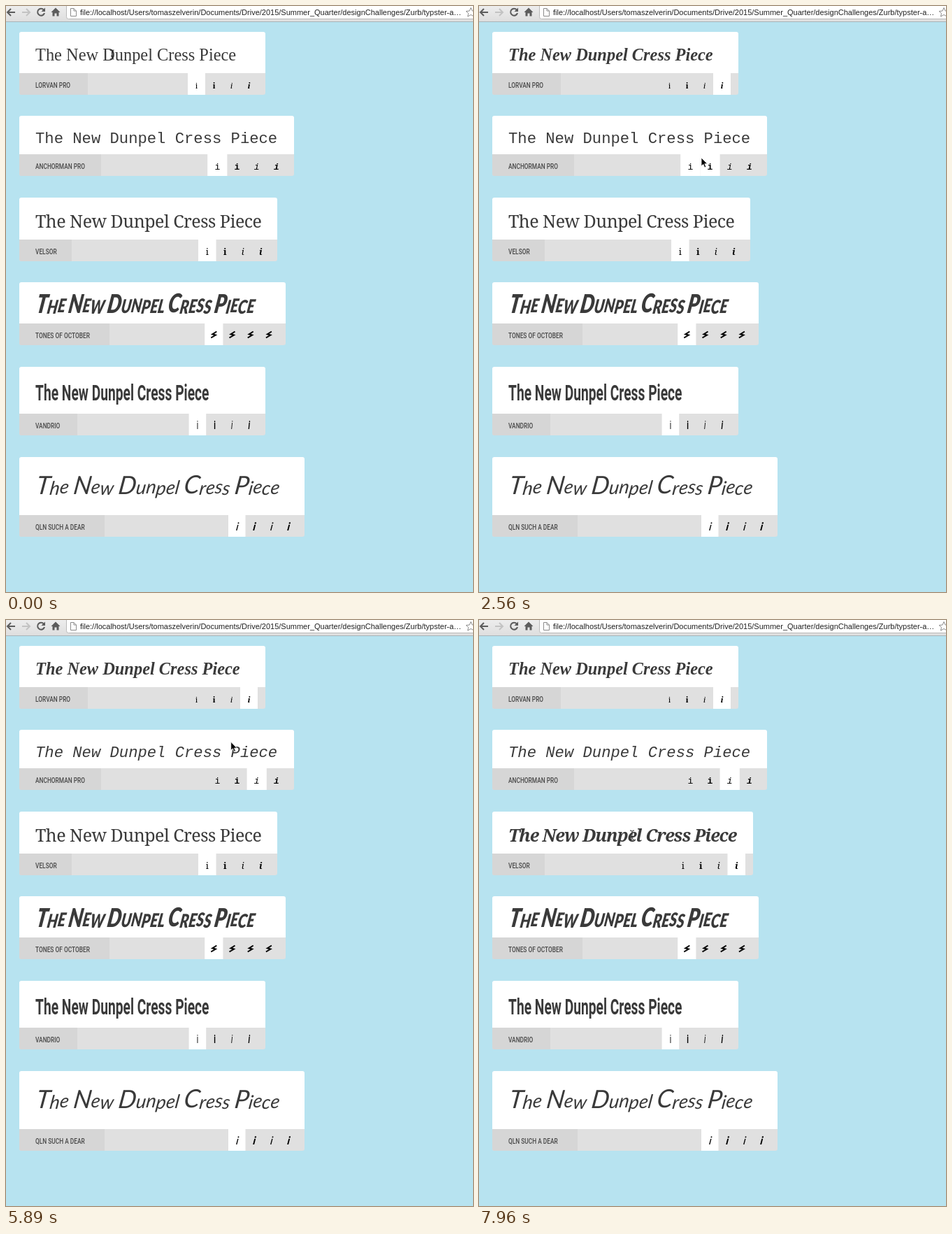
Animation of 668x838 px, one loop 8 s. Source, as an HTML page:

```html
<!DOCTYPE html>
<html lang="en">
<head>
<meta charset="utf-8">
<title>Font preview cards</title>
<style>
html, body { margin: 0; width: 100%; height: 100%; overflow: hidden; background: #b7e3f0; }
svg { display: block; width: 100%; height: 100%; }
.title { fill: #3a3a3a; }
.label { font: 500 11px Roboto, sans-serif; fill: #484848; }
.url { font: 11px "Liberation Sans", Arial, sans-serif; fill: #222; }
</style>
</head>
<body>
<svg id="stage" viewBox="0 0 668 838">
  <defs>
    <linearGradient id="chrome" x2="0" y2="1">
      <stop offset="0" stop-color="#ededed"/><stop offset="1" stop-color="#dedede"/>
    </linearGradient>
  </defs>
  <rect width="668" height="838" fill="#b7e3f0"/>
  <rect width="668" height="22" fill="url(#chrome)"/>
  <path d="M0 22.5H668" stroke="#a9b4b8"/>
  <rect x="86.5" y="-3.5" width="600" height="22" rx="3" fill="#fff" stroke="#b9b9b9"/>
  <g fill="none" stroke="#5c5c5c" stroke-width="2">
    <path d="M13 9H2M7 4L2 9L7 14"/>
    <path d="M23 9H34M29 4L34 9L29 14" stroke="#c3c3c3"/>
    <path d="M54 5.5A5 5 0 1 0 55 10"/>
    <path d="M56 2.5V8H50.5Z" fill="#5c5c5c" stroke="none"/>
    <path d="M71 2.5L64.5 9H66.5V14.5H69.5V10.5H72.5V14.5H75.5V9H77.5Z" fill="#5c5c5c" stroke="none"/>
    <path d="M92.5 3.5H97L100.5 7V14.5H92.5ZM97 3.5V7H100.5" stroke="#8c8c8c" stroke-width="1"/>
    <path d="M665 2.5L667 7L672 7.5L668.5 10.5L669.5 15L665 12.5L660.5 15L661.5 10.5L658 7.5L663 7Z" stroke="#8c8c8c" stroke-width="1"/>
  </g>
  <text class="url" x="106" y="13">file://localhost/Users/tomaszelverin/Documents/Drive/2015/Summer_Quarter/designChallenges/Zurb/typster-a…</text>
</svg>
<script>
const LOOP = 8000, TOP = 37, LEFT = 19, PAD = 42;
const BAR = 31, GAP = 30.6, TRAY_END = 11;
const PHRASE = 'The New Dunpel Cress Piece';
const stage = document.getElementById('stage');

// Styles run regular, bold, italic, bold italic
const isBold = style => style % 2 === 1;
const isItalic = style => style > 1;

function add(tag, attrs, parent = stage) {
  const el = document.createElementNS('http://www.w3.org/2000/svg', tag);
  for (const k in attrs) el.setAttribute(k, attrs[k]);
  return parent.appendChild(el);
}

function write(str, x, y, attrs, { narrow = 1, lean = 0 } = {}, parent = stage) {
  const transform = `translate(${x} ${y}) scale(${narrow} 1) skewX(${-lean})`;
  const el = add('text', { transform, ...attrs }, parent);
  el.textContent = str;
  return el;
}

// Hand lettering: large initials, small followers, a wobbling baseline
function scrawl(el, big, small, upper) {
  el.textContent = '';
  let last = 0;
  [...PHRASE].forEach((ch, i) => {
    const lift = Math.sin(i * 2.4);
    const span = add('tspan', { 'font-size': ch >= 'A' && ch <= 'Z' ? big : small, dy: lift - last }, el);
    span.textContent = upper ? ch.toUpperCase() : ch;
    last = lift;
  });
}

// Rectangle path rounded by a at the top and b at the bottom
const panel = (x, y, w, h, a, b) =>
  `M${x + a} ${y}h${w - 2 * a}q${a} 0 ${a} ${a}V${y + h - b}q0 ${b} ${-b} ${b}` +
  `h${2 * b - w}q${-b} 0 ${-b} ${-b}V${y + a}q0 ${-a} ${a} ${-a}z`;

// Each click moves to the next style, unless order says otherwise
const CARDS = [
  { name: 'LORVAN PRO', head: 59, drop: 18, tag: 117, right: 371, step: 25,
    font: '"Liberation Serif", Times, serif', size: 24.4, clicks: [370, 970, 1500] },
  { name: 'ANCHORMAN PRO', head: 55, drop: 16, tag: 136, right: 412, step: 28.2,
    font: '"Liberation Mono", "Courier New", monospace', size: 22.2,
    clicks: [2740, 3780, 4240, 5060], order: [0, 1, 2, 3, 2], hover: 240 },
  { name: 'VELSOR', head: 60, drop: 17, tag: 94, right: 388, step: 25.5,
    font: '"Noto Serif", serif', size: 25, weight: 500, grow: [0, 14, -2, 4], tight: true,
    clicks: [6840, 6960, 7140, 7490, 7670, 7780, 7960] },
  { name: 'TONES OF OCTOBER', head: 59, drop: 15, tag: 148, right: 400, step: 26.2,
    font: 'Lato, sans-serif', weight: 900, slope: true, face: { narrow: 0.76, lean: 12 },
    hand: [37, 27, true], mark: 'M4 -4.5L-2 -0.7L2.5 0.5L-4 4.5' },
  { name: 'VANDRIO', head: 67, drop: 19, tag: 102, right: 371, step: 24.6,
    font: 'Roboto, sans-serif', size: 31, weight: 600, face: { narrow: 0.62 }, icon: 16 },
  { name: 'QLN SUCH A DEAR', head: 83, drop: 30, tag: 141, right: 427, step: 24.5,
    font: 'Lato, sans-serif', slope: true, face: { lean: 8 }, hand: [36, 27, false], icon: 16 }
];

function build(c) {
  c.base = c.bar - c.drop;
  c.card = add('path', { fill: '#fff' });
  c.strip = add('path', { fill: '#e0e0e0' });
  add('path', { fill: '#d6d6d6', d: panel(LEFT, c.bar, c.tag - LEFT, BAR, 0, 3) });
  add('rect', { fill: '#d6d6d6', x: c.tag - 4, y: c.bar, width: 4, height: BAR });
  write(c.name, PAD, c.bar + 20.5, { class: 'label' }, { narrow: 0.76 });
  c.title = write(PHRASE, PAD, c.base, { class: 'title', 'font-family': c.font, 'font-size': c.size || 0 }, c.face);
  if (c.hand) scrawl(c.title, ...c.hand);

  c.tray = add('g', {});
  c.tiles = [0, 1, 2, 3].map(i => {
    const x = i * c.step, mid = x + c.step / 2;
    const tile = add('rect', { x, y: c.bar, width: c.step, height: BAR, fill: '#fff' }, c.tray);
    if (c.mark) {
      add('path', { d: c.mark, fill: 'none', stroke: '#000', 'stroke-width': 2,
        transform: `translate(${mid} ${c.bar + 16})` }, c.tray);
    } else {
      write('i', mid, c.bar + 21.5, { 'text-anchor': 'middle', 'font-family': c.font, 'font-size': c.icon || 13,
        'font-weight': isBold(i) ? 700 : 400, 'font-style': c.slope || isItalic(i) ? 'italic' : 'normal' }, c.face, c.tray);
    }
    return tile;
  });
}

function show(c, style, hover) {
  const right = c.right + (c.grow ? c.grow[style] : 0), w = right - LEFT;
  c.card.setAttribute('d', panel(LEFT, c.bar - c.head, w, c.head, 3, 0));
  c.strip.setAttribute('d', panel(LEFT, c.bar, w, BAR, 0, 3));
  c.tray.setAttribute('transform', `translate(${right - TRAY_END - 4 * c.step} 0)`);
  c.tiles.forEach((tile, i) => tile.setAttribute('opacity', i === style || i === hover ? 1 : 0));
  c.title.style.fontWeight = isBold(style) ? 700 : c.weight || 400;
  c.title.style.fontStyle = c.slope || isItalic(style) ? 'italic' : 'normal';
  if (c.tight) c.title.style.letterSpacing = isBold(style) ? '-1px' : '-0.5px';
}

function styleAt(c, t) {
  const n = (c.clicks || []).filter(click => click <= t).length;
  return c.order ? c.order[n] : n % 4;
}

let y = TOP;
for (const c of CARDS) {
  c.bar = Math.floor(y + 0.2) + c.head;
  y += c.head + BAR + GAP;
  build(c);
}

const arrow = add('path', { d: 'M0 0V12L2.8 9.5L4.8 14L6.8 13.1L4.8 8.8H8.6Z',
  fill: '#000', stroke: '#fff', 'stroke-width': 0.8 });
const beam = add('path', { d: 'M-3 -6.5Q0 -6.5 0 -5Q0 -6.5 3 -6.5M0 -5V5M-3 6.5Q0 6.5 0 5Q0 6.5 3 6.5M-1.5 2H1.5',
  fill: 'none', stroke: '#222' });

// Pointer moves: [start, end, x, y], each slowing down to its goal
const START = [151.5, 69.5];
const GLIDES = [
  [0, 200, 152, 76.5], [1500, 2260, 300, 176], [2320, 2740, 322, 226], [3130, 3310, 342, 224],
  [3600, 4060, 387, 231], [4240, 4530, 342, 231], [4820, 5590, 335, 117],
  [5650, 5890, 322, 174], [5890, 6660, 216.5, 308], [7490, 7960, 219, 307.5]
];

function pointer(t) {
  let [px, py] = START;
  for (const [from, to, x, y] of GLIDES) {
    const left = 1 - Math.min(1, Math.max(0, (t - from) / (to - from)));
    const k = 1 - left * left;
    px += (x - px) * k;
    py += (y - py) * k;
  }
  return [px, py];
}

function frame() {
  const t = performance.now() % LOOP;
  for (const c of CARDS) show(c, styleAt(c, t), styleAt(c, t + (c.hover || 0)));
  const [x, y] = pointer(t);
  const overText = CARDS.some(c => y > c.base - 21 && y < c.base + 5);
  arrow.setAttribute('opacity', overText ? 0 : 1);
  beam.setAttribute('opacity', overText ? 1 : 0);
  (overText ? beam : arrow).setAttribute('transform', `translate(${x} ${y})`);
  requestAnimationFrame(frame);
}
frame();
</script>
</body>
</html>
```
